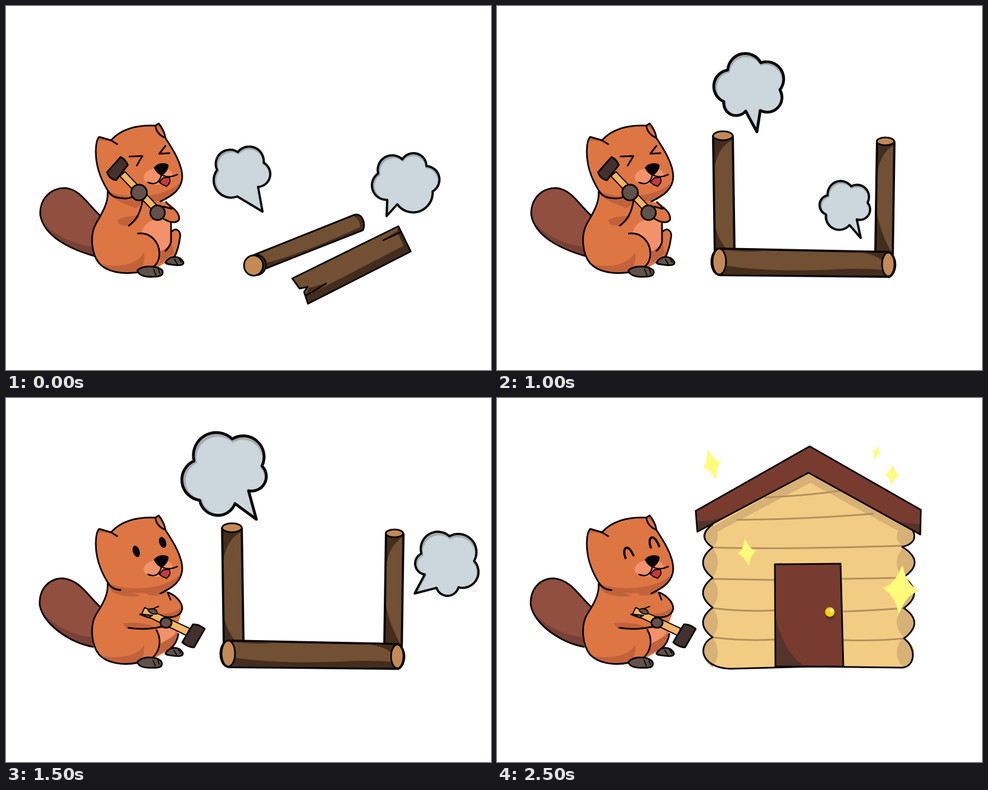
An HTML page for the animation above (3000 ms loop, 864x648 px).

```html
<!DOCTYPE html>
<html lang="en">
<head>
<meta charset="utf-8">
<title>Beaver builds a cabin</title>
<style>
  html, body { margin: 0; width: 100%; height: 100%; overflow: hidden; background: #fff; }
  svg { display: block; width: 864px; height: 648px; }
  path, ellipse, circle { stroke-linecap: round; stroke-linejoin: round; }
  .ink { stroke: #080606; stroke-width: 3; }
  .line { fill: none; }
  .fur { fill: #dd7643; } .furDark { fill: #c2623a; } .skin { fill: #f3926a; }
  .tail { fill: #914f3f; } .tailDark { fill: #7a4034; }
  .paw { fill: #61524a; } .iron { fill: #42322e; } .grip { fill: #f6b562; }
  .wood { fill: #725033; } .woodDark { fill: #432d1d; } .cut { fill: #c38a56; }
  .wall { fill: #f3cc84; } .wallDark { fill: #d7b176; }
  .roof { fill: #783b30; } .roofDark { fill: #54332b; }
  .seam { fill: none; stroke: #b0905e; stroke-width: 3; }
  .star { fill: #fffb7b; stroke: #fffb7b; stroke-width: 3; }
</style>
</head>
<body>
<svg viewBox="0 0 864 648">
  <!-- loose logs -->
  <g data-f="01">
    <path class="wood" d="M442 443L620 372C634 367 641 386 636 399L456 470Z"/>
    <path class="woodDark" d="M461 458C520 443 580 417 636 391L636 399L458 469Z"/>
    <path class="woodDark" d="M618 373C632 366 641 388 635 400L630 400C634 388 627 377 618 373Z"/>
    <path class="ink line" stroke-width="4" d="M442 443L620 372C634 367 641 386 636 399L456 470"/>
    <ellipse class="ink woodDark" cx="446" cy="461" rx="17" ry="18"/>
    <ellipse class="ink cut" cx="441" cy="462" rx="17" ry="18"/>
    <path class="wood" d="M510 485L699 392L721 437L538 530L531 509L537 500L523 503Z"/>
    <path class="woodDark" d="M699 392L721 437L714 440L697 402ZM534 517L712 425L721 437L538 530ZM672 417L697 400L703 404ZM534 516L539 502L570 494Z"/>
    <path class="ink line" d="M510 485L699 392L721 437L538 530L531 509L537 500L523 503ZM672 417L702 403M535 515Q552 506 570 494"/>
  </g>
  <g data-f="1">
    <path class="wood" d="M493 355L632 431L617 463L479 381C471 371 481 354 493 355Z"/>
    <path class="woodDark" d="M478 375C520 401 575 424 613 456L617 463L479 381ZM612 421L632 431L617 460Q622 437 612 421Z"/>
    <path class="ink line" style="stroke-width:4" d="M493 355L632 431L617 463L479 381C471 371 481 354 493 355Z"/>
    <ellipse class="ink cut" cx="626" cy="447" rx="11" ry="16" transform="rotate(18 626 447)"/>
  </g>

  <!-- log frame -->
  <g data-f="23">
    <path class="wood" d="M385 232L388 440H423L420 232ZM677 242L674 442H706L708 242Z"/>
    <path class="woodDark" d="M385 235L420 238Q390 252 386 300ZM388 436V388Q394 418 412 436ZM677 244L708 247Q682 262 677 300ZM674 440L676 365Q684 408 704 440Z"/>
    <path class="ink line" style="stroke-width:4" d="M385 232L388 436M420 232L423 436M677 242L674 442M708 242L705 442"/>
    <ellipse class="ink cut" cx="402.500" cy="231" rx="17.500" ry="8"/>
    <ellipse class="ink cut" cx="692" cy="241" rx="15.500" ry="7"/>
    <path class="ink wood" style="stroke-width:4" d="M397 432L698 438C713 446 713 474 699 482L397 479C377 476 378 434 397 432Z"/>
    <path class="woodDark" d="M407 462Q480 474 600 469Q655 466 688 470L694 480L404 478ZM403 434Q452 440 480 435ZM640 438L692 440L686 453Q672 441 640 438Z"/>
    <ellipse class="ink cut" cx="396" cy="455" rx="12" ry="23"/>
    <ellipse class="ink cut" cx="697" cy="460" rx="11" ry="21"/>
  </g>

  <!-- cabin -->
  <g data-f="45">
    <path id="wall" class="wall" d="M384 225Q355 246 384 266Q350 293 384 320Q350 347 384 373Q350 400 384 426C356 440 362 480 415 482L560 478L722 480C745 478 748 445 725 428Q762 400 725 374Q762 347 724 319Q765 292 722 265Q752 258 740 234L556 132Z"/>
    <g id="lobes"></g>
    <path class="wallDark" d="M372 236L556 133L740 235L738 248L706 232L558 151L374 248Z"/>
    <path class="seam" d="M384 266Q500 270 722 263M384 322L494 324M616 322L724 320M384 374Q440 381 494 378M618 380Q675 378 725 374M384 426Q440 433 494 430M618 431Q675 433 725 428M428 217Q550 216 670 206M478 177Q550 174 612 165"/>
    <path class="ink line" d="M384 225Q355 246 384 266Q350 293 384 320Q350 347 384 373Q350 400 384 426C356 440 362 480 415 482L560 478L722 480C745 478 748 445 725 428Q762 400 725 374Q762 347 724 319Q765 292 722 265Q752 258 740 234"/>
    <path class="roof" d="M354 201L557 86L755 199L754 243L555 133L357 238Z"/>
    <path class="roofDark" d="M357 238L356 219Q375 221 409 210ZM754 243L755 224Q736 225 708 218Z"/>
    <path class="ink line" d="M354 201L557 86L755 199L754 243L555 133L357 238Z"/>
    <path class="roof" d="M495 296L612 295L617 478H496Z"/>
    <path class="roofDark" d="M497 390C504 430 525 465 550 478H497Z"/>
    <path class="ink line" d="M495 296L612 295Q615 390 617 478H496Z"/>
    <circle class="roofDark" cx="594" cy="386" r="9"/>
    <circle cx="593" cy="381" r="8.500" fill="#ffd10a"/>
    <circle cx="596" cy="378" r="3" fill="#fff8d8"/>
  </g>

  <!-- beaver, hammer raised -->
  <g data-f="024">
    <path class="tail" d="M157 445C115 433 68 411 61 372C60 344 78 324 106 324C134 327 148 357 168 373Z"/>
    <path class="tailDark" d="M157 445C115 433 78 415 64 384C90 412 125 425 155 429Z"/>
    <path class="ink line" d="M157 445C115 433 68 411 61 372C60 344 78 324 106 324C134 327 148 357 168 373"/>
    <path class="fur" d="M181 328C183 352 168 373 160 388C149 408 152 442 166 458C180 474 208 478 236 474L272 464L303 446C308 430 314 412 309 402Q301 394 295 400L294 384L276 340Z"/>
    <path class="furDark" d="M168 459C195 467 235 462 246 438Q249 460 236 474C205 478 182 473 168 459ZM198 381Q214 372 240 374Q230 388 216 391Q200 393 198 381ZM183 334Q220 344 252 344L231 360Q190 345 183 334Z"/>
    <path class="skin" d="M241 404C248 385 260 378 282 380L294 387V420Q286 434 274 437C271 417 256 406 241 404Z"/>
    <path class="furDark" d="M274 437Q288 433 294 420L300 440L275 458Z"/>
    <path class="ink line" d="M181 331C183 352 168 373 160 388C149 408 152 442 166 458C180 474 208 478 236 474M235 405C258 402 275 422 273 444Q272 459 260 466M294 386L294 420Q291 430 284 436M296 401C304 393 312 402 310 412Q307 434 300 446"/>
    <path class="ink paw" d="M234 471C244 460 270 463 278 470C282 478 276 482 262 482C247 483 236 479 234 471ZM284 457C291 444 309 443 316 456C317 462 308 462 300 461C292 459 287 461 284 457Z"/>
    <path class="ink line" style="stroke-width:2" d="M263 469L267 479M271 467L274 476M300 451L305 459M308 449L312 456"/>
  </g>

  <!-- beaver, hammer lowered -->
  <g data-f="135">
    <path class="tail" d="M155 443C112 435 66 402 60 368C59 338 78 321 101 321C132 324 146 352 167 371Z"/>
    <path class="tailDark" d="M155 443C112 435 75 410 63 380C90 410 125 423 153 426Z"/>
    <path class="ink line" d="M155 443C112 435 66 402 60 368C59 338 78 321 101 321C132 324 146 352 167 371"/>
    <path class="fur" d="M181 328C183 352 168 373 160 386C149 406 152 440 166 457C180 472 208 477 236 471L265 463L298 444Q309 425 305 405L314 378C314 362 300 350 288 346L276 338Z"/>
    <path class="furDark" d="M168 458C195 466 236 460 246 440Q248 460 236 471C205 477 182 472 168 458ZM182 333Q210 341 240 352Q215 357 190 346ZM252 340Q275 341 286 346Q270 355 252 350ZM208 401Q235 398 258 405L270 410Q230 413 214 410ZM272 384Q300 385 312 372Q312 392 280 389Z"/>
    <path class="skin" d="M272 410L304 411Q302 425 275 437Q276 422 269 413Z"/>
    <path class="furDark" d="M275 437Q290 430 306 418Q303 436 293 446L270 457Z"/>
    <path class="ink line" d="M181 331C183 352 168 373 160 386C149 406 152 440 166 457C180 472 208 477 236 471M268 413C278 431 274 452 260 463M307 420Q305 436 293 446M288 346C300 350 314 362 314 375C311 390 293 393 276 388M288 346L293 359M218 409Q245 414 278 407M239 385Q260 394 276 394"/>
    <path class="ink paw" d="M234 470C244 458 269 461 276 468C281 477 275 481 262 480C247 481 236 478 234 470ZM284 455C291 442 308 441 315 454C316 460 308 460 300 459C292 457 287 459 284 455Z"/>
    <path class="ink line" style="stroke-width:2" d="M262 467L266 477M270 465L273 474M299 449L304 457M307 447L311 454"/>
    <path class="ink grip" style="stroke-width:2" d="M247 373L327 410L322 423L242 384Z"/>
    <path class="ink iron" d="M333 403Q343 402 354 411L335 444Q325 444 314 435Z"/>
    <ellipse class="ink paw" cx="285" cy="400" rx="10" ry="9"/>
    <path class="ink paw" style="stroke-width:2" d="M253 378Q258 372 268 378L270 384Q260 387 253 378ZM244 385L261 387L253 391Z"/>
    <path class="ink line" style="stroke-width:2" d="M262 375L272 371"/>
  </g>

  <!-- head -->
  <path class="fur" d="M160 260Q160 239 166 233L187 239C204 220 232 211 266 213L272 209Q282 221 284 235C298 256 314 282 314 304C313 326 298 339 276 347Q225 350 190 340C172 314 162 286 160 260Z"/>
  <path class="furDark" d="M182 330C215 344 280 343 311 314Q304 336 276 347Q225 350 190 340ZM166 233L187 239L196 246Q180 238 165 240ZM268 214L273 210Q281 221 283 234Q279 221 268 214Z"/>
  <path class="ink line" d="M204 342Q188 341 181 328C167 305 160 282 160 260Q160 239 166 233L187 239L198 246M187 239C204 220 232 211 266 213L272 209Q282 221 284 235C298 256 314 282 314 304C313 326 298 337 275 348M266 213Q268 228 284 235"/>
  <ellipse class="skin" cx="271" cy="303" rx="26" ry="15" transform="rotate(-6 271 303)"/>
  <path class="ink" fill="#c43a45" style="stroke-width:2" d="M273 314L280 306L291 305Q295 314 286 321Q279 319 273 314Z"/>
  <path class="ink line" style="stroke-width:2.500" d="M253 314Q272 322 277 300Q288 308 305 300"/>
  <path class="ink" style="stroke-width:1" d="M264 288C268 280 283 278 289 283C290 291 281 301 277 301C272 300 266 294 264 288Z"/>

  <g class="ink line">
    <path data-f="024" d="M220 268L243 267L233 284M284 249L273 263L291 262"/>
    <path data-f="5" style="stroke-width:4" d="M229 285C222 268 232 256 243 280M274 266C267 248 279 238 289 264"/>
  </g>
  <g data-f="13">
    <ellipse cx="232" cy="273" rx="6" ry="10.500" transform="rotate(-18 232 273)"/>
    <ellipse cx="279" cy="257" rx="6" ry="10" transform="rotate(-18 279 257)"/>
  </g>

  <!-- raised hammer and arms -->
  <g data-f="024">
    <path class="fur" d="M276 350L285 349C300 355 311 371 308 381Q300 390 276 378Z"/>
    <path class="ink line" d="M243 347Q239 376 219 391M206 342Q216 344 225 340M285 349L294 358C304 363 310 373 308 381Q300 390 281 379M280 357L295 361"/>
    <path class="ink grip" style="stroke-width:2" d="M212 295L274 360L265 368L203 303Z"/>
    <path class="ink iron" d="M180 296L204 269Q212 272 217 283L196 310Q185 309 180 296Z"/>
    <circle class="ink paw" cx="237" cy="332" r="14"/>
    <circle class="ink paw" cx="270" cy="368" r="13"/>
  </g>

  <g id="effects"></g>
</svg>
<script>
const STEP = 500, STEPS = 6;
const byId = id => document.getElementById(id);

// Puffy bubble: lobes bulge between valleys, then a pointed tip closes it.
function cloud(step, tip, valleys, width = 5) {
  const lobes = valleys.slice(1).map(([x, y], i) => {
    const [px, py] = valleys[i];
    const r = 0.52 * Math.hypot(x - px, y - py);
    return `A${r} ${r} 0 0 1 ${x} ${y}`;
  });
  const d = `M${valleys[0]}${lobes.join("")}L${tip}Z`;
  const n = valleys.length;
  const cx = valleys.reduce((s, v) => s + v[0], 0) / n;
  const cy = valleys.reduce((s, v) => s + v[1], 0) / n;
  return `<g data-f="${step}"><path d="${d}" fill="#a4abad"/>
    <path d="${d}" fill="#cbd7dd" transform="translate(${cx + 1} ${cy + 2}) scale(.93) translate(${-cx} ${-cy})"/>
    <path class="ink line" style="stroke-width:${width}" d="${d}"/></g>`;
}

function star(step, x, y, rx, ry, tilt = 0) {
  const a = rx * 0.28, b = ry * 0.28;
  return `<path class="star" data-f="${step}" transform="translate(${x} ${y}) rotate(${tilt})"
    d="M0 ${-ry}Q${a} ${-b} ${rx} 0Q${a} ${b} 0 ${ry}Q${-a} ${b} ${-rx} 0Q${-a} ${-b} 0 ${-ry}Z"/>`;
}

byId("lobes").innerHTML = [225, 266, 320, 373, 426].map((y, i) => {
  const h = [41, 54, 53, 53, 54][i], m = y + h / 2;
  const side = (x, out, inner) => `M${x} ${y}Q${out} ${m} ${x} ${y + h}Q${inner} ${m} ${x} ${y}Z`;
  return `<path class="wallDark" d="${side(384, 350, 403)}${side(724, 762, 700)}"/>`;
}).join("");

byId("effects").innerHTML = [
  cloud(0, [457, 366], [[412, 339], [376, 292], [413, 260], [459, 279], [449, 322]], 4),
  cloud(0, [678, 374], [[679, 345], [663, 298], [706, 273], [749, 285], [760, 330], [697, 353]], 4),
  cloud(1, [522, 344], [[461, 300], [412, 228], [468, 187], [530, 222], [517, 280]]),
  cloud(1, [644, 350], [[665, 323], [678, 270], [731, 266], [757, 307], [733, 351], [673, 341]], 4),
  cloud(2, [463, 224], [[443, 187], [404, 170], [411, 114], [470, 101], [504, 149], [469, 186]]),
  cloud(2, [648, 413], [[628, 390], [586, 371], [589, 337], [631, 321], [660, 350], [641, 380]], 4),
  cloud(3, [446, 216], [[408, 188], [345, 182], [335, 112], [403, 73], [456, 121], [432, 165]]),
  cloud(3, [728, 348], [[746, 314], [740, 277], [790, 246], [834, 290], [806, 337], [767, 338]], 4),
  star(4, 390, 118, 20, 27), star(4, 677, 101, 7, 9, 10), star(4, 712, 136, 11, 16),
  star(5, 383, 119, 14, 25, -16), star(5, 676, 97, 5, 9, 15), star(5, 704, 137, 10, 15, 5),
  star(5, 445, 275, 14, 21, -8), star(5, 719, 341, 29, 40, 4)
].join("");

const parts = [...document.querySelectorAll("[data-f]")];
function draw() {
  const step = Math.floor(performance.now() / STEP) % STEPS;
  for (const part of parts) part.style.display = part.dataset.f.includes(step) ? "" : "none";
  requestAnimationFrame(draw);
}
draw();
</script>
</body>
</html>
```
